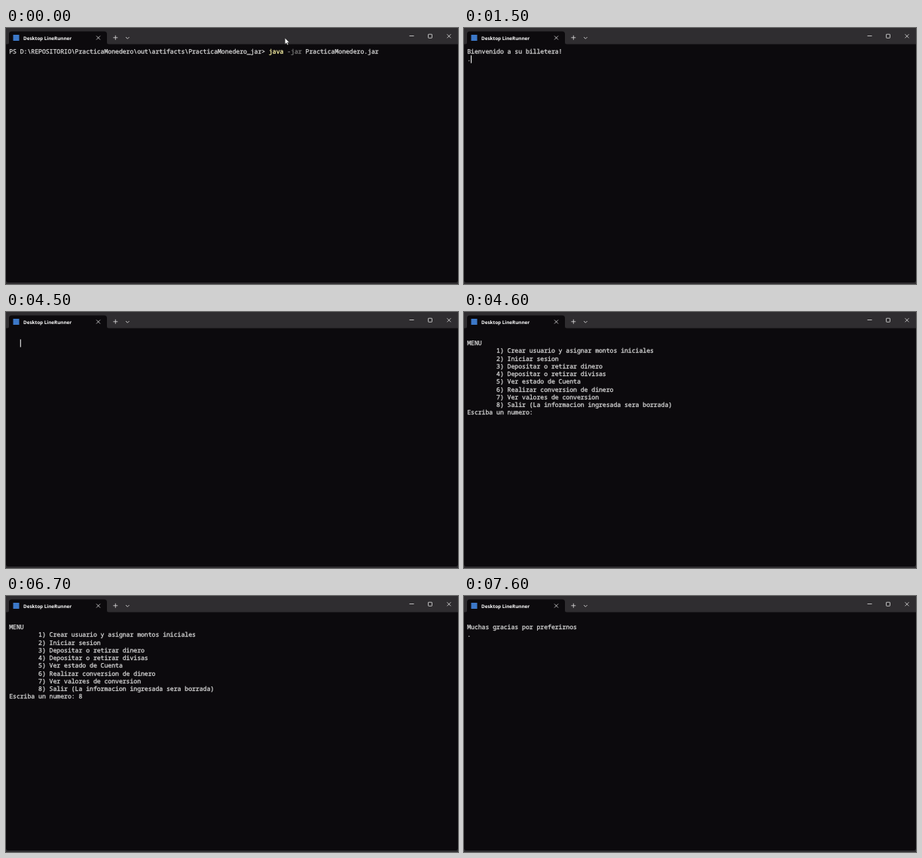
Recreate the animation shown at these times as an HTML page. Size 600 by 340 pixels, loop 8 s.

```html
<!DOCTYPE html>
<html lang="es">
<head>
<meta charset="utf-8">
<title>Terminal</title>
<style>
  html, body { margin: 0; width: 100%; height: 100%; overflow: hidden; background: #2f2d30; }
  svg { display: block; width: 600px; height: 340px; }
  text { white-space: pre; text-rendering: geometricPrecision; }
  #screen { font: 500 8.1px "Noto Sans Mono", "DejaVu Sans Mono", monospace; color: #d0d0d0; }
  #screen text, #screen tspan { fill: currentColor; stroke: currentColor; stroke-width: .32; }
  #title { font: 700 6.3px "Open Sans", "Noto Sans", sans-serif; fill: #fff; }
  .icons { fill: none; stroke: #e8e8e8; stroke-width: .75; }
  .program { color: #f9f1a5; }
  .option { color: #767676; }
</style>
</head>
<body>
<svg viewBox="0 0 600 340">
  <rect width="600" height="340" fill="#2f2d30"/>
  <path d="M0 21.5H600V335Q600 338 597 338H3Q0 338 0 335Z" fill="#0c0a0d"/>
  <path d="M1 22Q4 22 4 19V8Q4 4.5 7.5 4.5H130.5Q134 4.5 134 8V19Q134 22 137 22Z" fill="#0c0a0d"/>
  <rect x="9.5" y="9" width="8" height="8" fill="#3c78c8"/>
  <text id="title" x="23" y="15.6">Desktop LineRunner</text>
  <g class="icons">
    <path d="M120 10.5l5 5m0-5l-5 5"/>
    <path d="M142.3 12.8h6m-3-3v6"/>
    <path d="M159 12l2.300 2.300l2.300-2.300"/>
    <path d="M535.500 10.500h6"/>
    <rect x="560.500" y="8.300" width="5" height="5" rx=".6"/>
    <path d="M585.500 8.300l5 5m0-5l-5 5"/>
  </g>
  <g id="screen"></g>
  <rect id="caret" width="1" height="10.250" fill="#fff"/>
  <path id="pointer" d="M370.300 13.200v8.200l1.900-1.700l1.300 2.900l1.300-.6l-1.300-2.800h2.600Z"
        fill="#fff" stroke="#111" stroke-width=".4"/>
</svg>
<script>
const LOOP = 8000, LEFT = 4.2, TOP = 26.1, BASELINE = 7.7, COLUMN = 4.86, ROW = 10.25;
const [screen, caret, pointer] = ["screen", "caret", "pointer"].map(id => document.getElementById(id));

const command = [
  "PS D:\\REPOSITORIO\\PracticaMonedero\\out\\artifacts\\PracticaMonedero_jar&gt; " +
  '<tspan class="program">java</tspan> <tspan class="option">-jar</tspan> PracticaMonedero.jar'
];
const welcome = dots => ["Bienvenido a su billetera!", ".".repeat(dots)];
const options = [
  "Crear usuario y asignar montos iniciales",
  "Iniciar sesion",
  "Depositar o retirar dinero",
  "Depositar o retirar divisas",
  "Ver estado de Cuenta",
  "Realizar conversion de dinero",
  "Ver valores de conversion",
  "Salir (La informacion ingresada sera borrada)"
];
const menu = answer => [
  "", "MENU",
  ...options.map((label, i) => " ".repeat(8) + (i + 1) + ") " + label),
  "Escriba un numero: " + answer
];
const thanks = ["", "Muchas gracias por preferirnos", "."];

// [start in ms, lines, caret as [row, column] when visible]
const states = [
  [0, command],
  [500, command, [0, 101]],
  [1000, command],
  [1300, command, [1, 0]],
  [1500, welcome(1), [1, 1]],
  [1900, welcome(1)],
  [2400, welcome(1), [1, 1]],
  [2500, welcome(2), [1, 2]],
  [3000, welcome(2)],
  [3500, welcome(3), [1, 3]],
  [4000, welcome(3)],
  [4500, [], [1, 3]],
  [4600, menu("")],
  [5200, menu(""), [10, 19]],
  [5700, menu("")],
  [6000, menu("8")],
  [6100, menu("8"), [10, 20]],
  [6700, menu("8")],
  [7000, thanks, [2, 1]],
  [7600, thanks]
];

function show([start, lines, position]) {
  screen.innerHTML = lines.map((line, row) =>
    `<text x="${LEFT}" y="${TOP + row * ROW + BASELINE}">${line}</text>`).join("");
  caret.style.display = position ? "" : "none";
  if (position) {
    caret.setAttribute("x", LEFT + position[1] * COLUMN);
    caret.setAttribute("y", TOP + position[0] * ROW);
  }
  pointer.style.display = start < 1300 ? "" : "none";
}

let current;
function frame() {
  const time = performance.now() % LOOP;
  const state = states.findLast(([start]) => start <= time);
  if (state !== current) show(current = state);
  requestAnimationFrame(frame);
}
frame();
</script>
</body>
</html>
```
